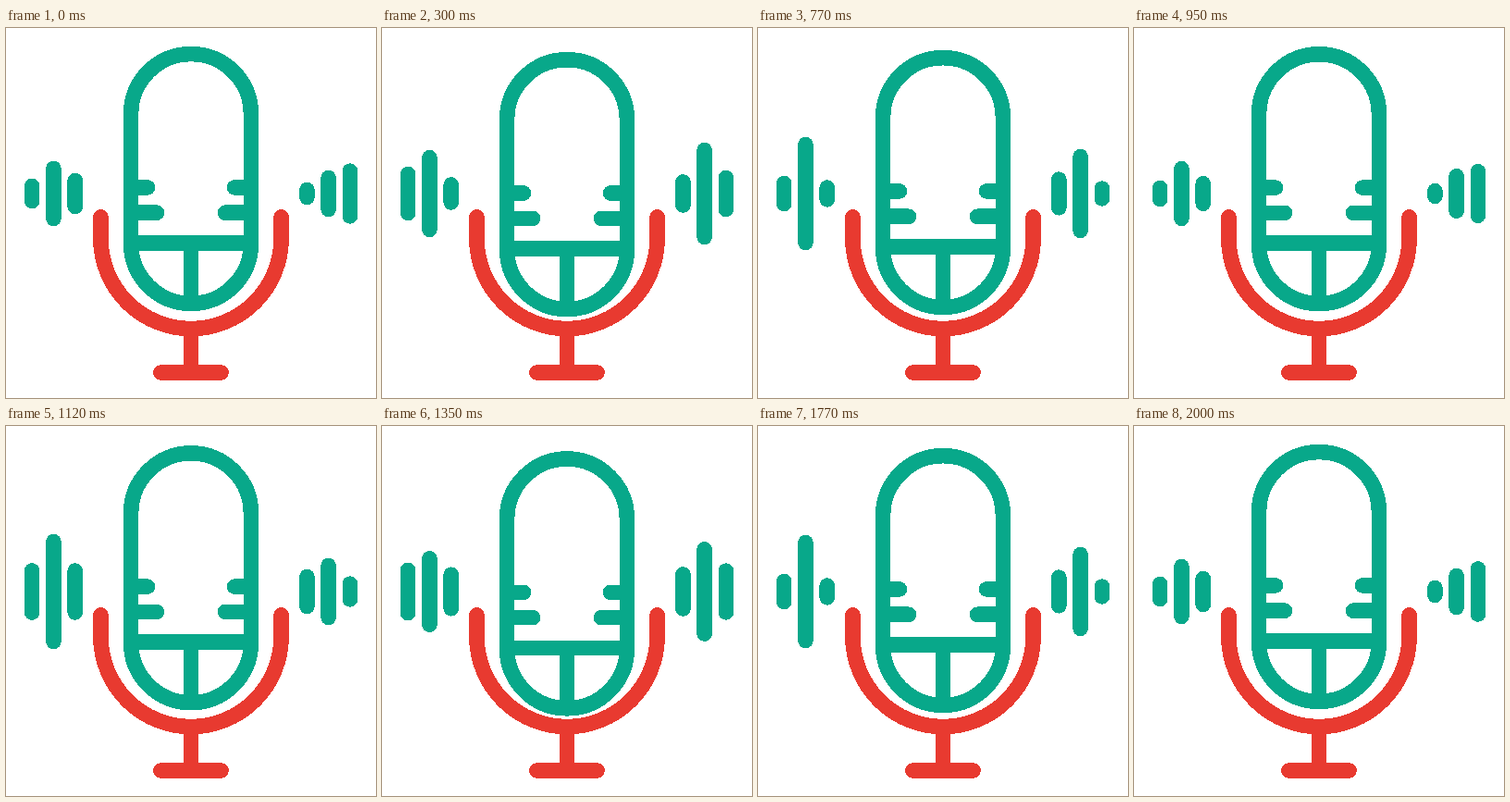
Recreate the animation shown at these times as an HTML page. Size 400 by 400 pixels, loop 2020 ms.

```html
<!DOCTYPE html>
<html lang="en">
<head>
<meta charset="utf-8">
<title>Microphone</title>
<style>
  html, body { margin: 0; width: 100%; height: 100%; overflow: hidden; background: #fff; }
  svg { display: block; width: 100%; height: 100%; shape-rendering: crispEdges; }
  path, rect { fill: none; stroke-width: 16.6; stroke-linecap: round; }
  .green { stroke: #08a88a; }
  .red { stroke: #e83a30; }
</style>
</head>
<body>
<svg viewBox="0 0 400 400">
  <g id="mic">
    <rect class="green" x="135.1" y="28.1" width="129.8" height="269.8" rx="64.9"/>
    <path class="green" d="M135 232.5H265M200 232.5V298M135 172.4H153M135 199.7H163M265 172.4H247M265 199.7H237"/>
  </g>
  <path class="red" d="M102.4 204.4V227.5A97.6 97.6 0 0 0 297.6 227.5V204.4M200 325V372M167.4 372.5H232.6"/>
  <g id="bars"></g>
</svg>
<script>
const LOOP = 2020, CYCLE = 1000, MIDDLE = 179;

// Bar heights at these phases of one cycle
const phases = [0, 120, 300, 520, 570, 770];
const bars = [
  { x: 28.1,  heights: [32, 61, 58, 64, 40, 38] },
  { x: 51.4,  heights: [70, 124, 94, 74, 74, 122] },
  { x: 74.7,  heights: [44, 61, 35, 121, 97, 29] },
  { x: 325.4, heights: [24, 48, 41, 116, 126, 47] },
  { x: 348.6, heights: [50, 72, 110, 76, 75, 96] },
  { x: 371.9, heights: [65, 33, 50, 94, 88, 27] }
];

const mic = document.getElementById('mic');
for (const bar of bars) {
  bar.path = document.createElementNS('http://www.w3.org/2000/svg', 'path');
  bar.path.setAttribute('class', 'green');
  document.getElementById('bars').append(bar.path);
}

const count = phases.length;
const wrap = i => (i + count) % count;
const phaseAt = i => phases[wrap(i)] + Math.floor(i / count) * CYCLE;

// Smooth periodic curve through the heights
function heightAt(heights, phase) {
  const value = i => heights[wrap(i)];
  const span = i => phaseAt(i + 1) - phaseAt(i);
  const slope = i => (value(i + 1) - value(i)) / span(i);
  const tangent = i =>
    (slope(i - 1) * span(i) + slope(i) * span(i - 1)) / (span(i - 1) + span(i));

  let i = count - 1;
  while (phases[i] > phase) i--;
  const h = span(i), u = (phase - phases[i]) / h, v = 1 - u;
  return v * v * (1 + 2 * u) * value(i) + u * u * (1 + 2 * v) * value(i + 1)
    + h * u * v * (v * tangent(i) - u * tangent(i + 1));
}

function draw(time) {
  const phase = Math.min(time % LOOP, 2 * CYCLE) % CYCLE;
  const drop = 4.65 * (1 - Math.cos(2 * Math.PI * phase / CYCLE));
  mic.setAttribute('transform', `translate(0 ${drop})`);
  for (const { x, heights, path } of bars) {
    const reach = Math.max(heightAt(heights, phase) / 2 - 8, 0.1);
    path.setAttribute('d', `M${x} ${MIDDLE - reach}V${MIDDLE + reach}`);
  }
}

const start = performance.now();
function tick() {
  draw(performance.now() - start);
  requestAnimationFrame(tick);
}
tick();
</script>
</body>
</html>
```
